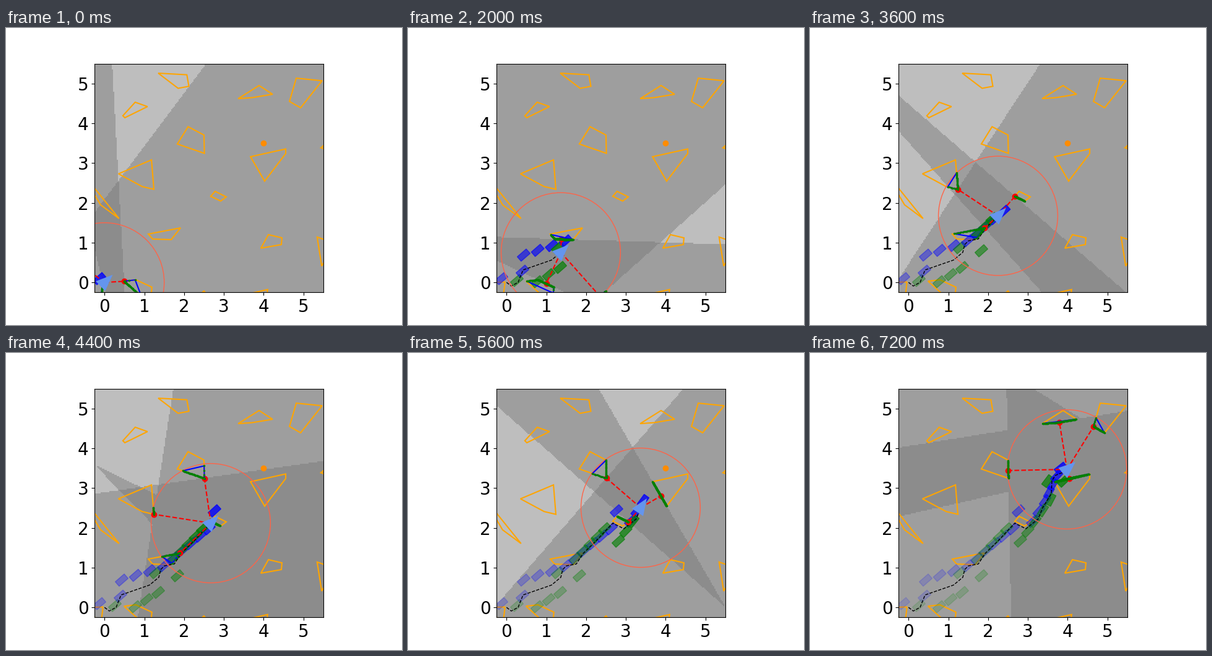
Write a matplotlib script that moves like this. It is 640x480 px and loops after 7400 ms.

```python
import numpy as np
import matplotlib.pyplot as plt
from matplotlib.animation import FuncAnimation
from matplotlib.colors import ListedColormap
from matplotlib.patches import Circle, Polygon

FRAMES, STEP_MS = 37, 200
LOW, HIGH = -0.25, 5.5
GOAL = (4, 3.5)

# Range sensor: obstacles with too few hits are ignored
RANGE, RAYS, MIN_HITS = 1.5, 720, 8

OBSTACLES = [np.array(p) for p in (
    [(1.35, 5.26), (2.07, 5.22), (2.12, 4.93), (1.85, 4.88)],
    [(.46, 4.19), (.77, 4.53), (1.08, 4.42), (.51, 4.14)],
    [(.35, 2.73), (1.18, 3.08), (1.24, 2.34), (.945, 2.41)],
    [(1.83, 3.48), (2.1, 3.915), (2.5, 3.705), (2.51, 3.245)],
    [(3.36, 4.62), (3.885, 4.95), (4.225, 4.73), (3.706, 4.645)],
    [(4.82, 5.135), (5.47, 5.07), (4.93, 4.39), (4.65, 4.55)],
    [(3.67, 3.16), (4.555, 3.355), (4.555, 3.24), (4.025, 2.545)],
    [(2.67, 2.165), (2.78, 2.29), (3.06, 2.15), (2.92, 2.045)],
    [(1.1, 1.215), (1.91, 1.37), (1.675, 1.075), (1.21, 1.09)],
    [(3.93, .86), (4.12, 1.2), (4.46, 1.12), (4.445, .95)],
    [(5.345, 1.14), (5.8, .98), (5.46, .41)],
    [(5.44, 3.385), (5.7, 3.6), (5.7, 3.3)],
    [(-.6, 2.8), (.365, 1.605), (-.1, 1.95)],
    [(.49, .03), (.79, .065), (1.19, -.12), (1.17, -.35), (.95, -.38)],
    [(-.5, 0), (-.045, .01), (-.04, -.01), (-.09, -.4)],
    [(2.28, -.41), (2.5, -.215), (2.65, -.4)],
    [(3.7, -.27), (4.1, -.18), (4.07, -.4)],
    [(-1, .745), (-.9, 1), (-1.4, 1.1)],
)]
STARTS = np.vstack(OBSTACLES)
SIDES = np.vstack([np.roll(p, -1, axis=0) for p in OBSTACLES]) - STARTS
OWNER = np.repeat(np.arange(len(OBSTACLES)), [len(p) for p in OBSTACLES])


def trail(keys):
    """Map positions for every step, linear between {step: stage pixel} keys."""
    points = np.array(list(keys.values()), float)
    points = (points - [159.3, 411.1]) / [64.28, -64.28]
    steps = np.arange(FRAMES)
    return np.column_stack([np.interp(steps, list(keys), c) for c in points.T])


BODY = trail({0: (159.3, 411.1), 1: (167, 417), 2: (178, 411), 4: (186, 391),
              8: (232, 375), 10: (247, 362.5), 11: (250, 350), 12: (256, 344),
              13: (272, 341), 15: (283, 324), 18: (304, 303.5),
              22: (331, 275), 24: (349, 284), 26: (369, 268), 28: (376, 250),
              31: (390, 227.5), 33: (391, 207), 34: (396, 198),
              35: (411, 192), 36: (415.4, 188)})
LEFT = trail({0: (151, 405), 2: (185, 393), 4: (187, 367), 10: (255, 344),
              20: (328, 284), 22: (337, 255), 24: (360, 272), 28: (380, 239),
              36: (405, 186)})
RIGHT = trail({1: (176, 408), 3: (209, 410), 7: (246, 387), 9: (242, 355),
               11: (277, 360), 13: (271, 332), 21: (318, 284), 23: (340, 304),
               27: (364, 272), 31: (389, 237), 33: (384, 207), 35: (410, 207)})
HEADING = np.radians(np.interp(np.arange(FRAMES), [0, 24, 31, 36],
                               [43, 45, 65, 41]))

# Shade by number of overlapping safe half-planes
SHADES = ListedColormap([(v / 255,) * 3 for v in (255, 190, 158, 140)])
CELLS = 185
cells = LOW + (np.arange(CELLS) + .5) * (HIGH - LOW) / CELLS
GX, GY = np.meshgrid(cells, cells)


def cross(a, b):
    return a[..., 0] * b[..., 1] - a[..., 1] * b[..., 0]


def placed(shape, center, angle):
    c, s = np.cos(angle), np.sin(angle)
    return np.array(shape) @ np.array([[c, s], [-s, c]]) + center


def sense(pos):
    """Cast rays from pos; yield nearest hit and all hits per obstacle."""
    angles = (np.arange(RAYS) + .3) * 2 * np.pi / RAYS
    rays = np.column_stack([np.cos(angles), np.sin(angles)])
    offset = STARTS - pos
    den = cross(rays[:, None], SIDES[None])
    dist = cross(offset, SIDES) / den
    along = cross(offset[None], rays[:, None]) / den
    dist[(dist <= 0) | (along < 0) | (along > 1)] = np.inf
    owner, dist = OWNER[dist.argmin(axis=1)], dist.min(axis=1)

    for i in range(len(OBSTACLES)):
        hits = np.flatnonzero((owner == i) & (dist <= RANGE))
        if len(hits) < MIN_HITS:
            continue
        near = hits[dist[hits].argmin()]
        hits = hits[np.argsort((hits - near + RAYS // 2) % RAYS)]
        yield (pos + dist[near] * rays[near],
               pos + dist[hits, None] * rays[hits])


def draw_feet(k):
    foot = [(-.15, -.075), (.15, -.075), (.15, .075), (-.15, .075)]
    for j in range(k + 1):
        spots, color = ((LEFT, "blue"), (RIGHT, "green"))[j % 2]
        ax.add_patch(Polygon(placed(foot, spots[j], HEADING[j] - .04),
                             color=color, alpha=.8 * .95 ** (k - j), lw=1,
                             zorder=2))


def draw(k):
    ax.cla()
    pos = BODY[k]
    for poly in OBSTACLES:
        ax.add_patch(Polygon(poly, fill=False, ec="orange", lw=1.5, zorder=1.5))
    draw_feet(k)
    ax.plot(*BODY[:k + 1].T, "--", color="black", lw=1, zorder=2.1)

    count = np.zeros_like(GX)
    for near, hits in sense(pos):
        nx, ny = near - pos
        count += (GX - near[0]) * nx + (GY - near[1]) * ny <= 0
        ax.add_patch(Polygon(hits, fill=False, ec="blue", lw=1.5, zorder=2.2))
        ax.plot(*hits.T, "o", color="green", ms=1.5, zorder=2.3)
        ax.plot(*zip(pos, near), "--", color="red", lw=1.5, zorder=2.15)
        ax.plot(*near, "o", color="red", ms=6, zorder=2.18)

    ax.imshow(np.minimum(count, 3), cmap=SHADES, vmin=-.5, vmax=3.5,
              origin="lower", extent=(LOW, HIGH, LOW, HIGH),
              interpolation="nearest", zorder=0)
    ax.add_patch(Circle(pos, RANGE, fill=False, ec="tomato", lw=1, zorder=2.1))
    ax.plot(*GOAL, "o", color="darkorange", ms=6)
    arrow = [(.28, 0), (-.14, .17), (-.14, -.17)]
    ax.add_patch(Polygon(placed(arrow, pos, HEADING[k]), fc="cornflowerblue",
                         ec="none", zorder=2.4))

    ax.set(xlim=(LOW, HIGH), ylim=(LOW, HIGH), aspect="equal",
           xticks=range(6), yticks=range(6))
    ax.tick_params(labelsize=20)


fig, ax = plt.subplots(figsize=(6.4, 4.8), dpi=100)
anim = FuncAnimation(fig, draw, frames=FRAMES, interval=STEP_MS,
                     init_func=lambda: None, repeat=True, repeat_delay=0)
plt.show()
```
